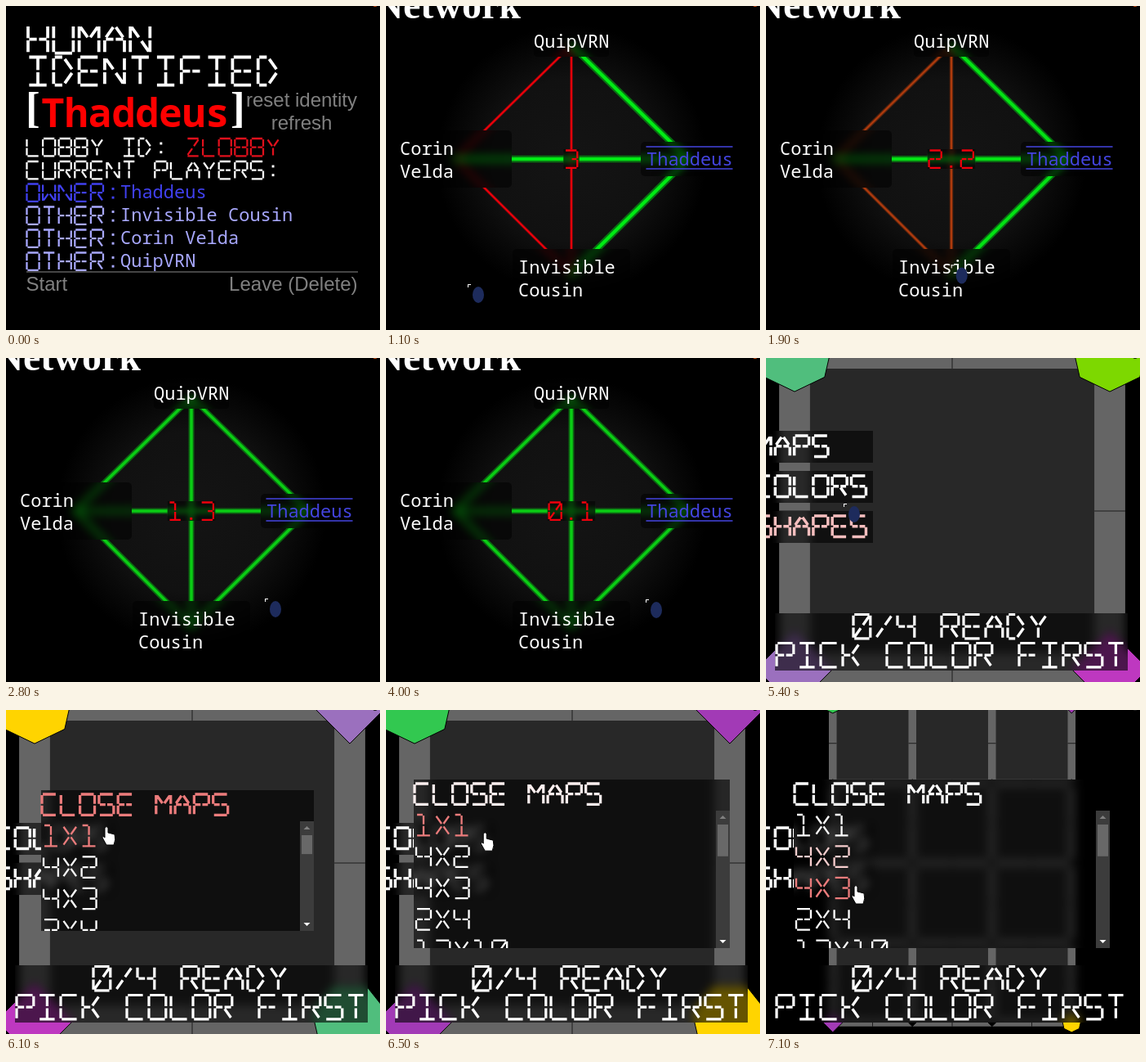
Write an HTML page with a canvas that moves like this. It is 458 by 396 pixels and loops after 7200 ms.

```html
<!DOCTYPE html>
<html lang="en">
<head>
<meta charset="utf-8">
<title>Lobby to map</title>
<style>
  html, body { margin: 0; width: 100%; height: 100%; overflow: hidden; background: #000; }
  canvas { display: block; width: 458px; height: 396px; }
</style>
</head>
<body>
<canvas id="stage" width="458" height="396"></canvas>
<script>
const canvas = document.getElementById('stage');
const ctx = canvas.getContext('2d');
const LOOP = 7200, STEP = 100;
const MONO = '"Noto Sans Mono", monospace';
const SANS = '"Liberation Sans", Arial, sans-serif';
const SERIF = '"Liberation Serif", serif';
const ME = 'Thaddeus', BOT = 'QuipVRN';

// Segments join points of a 3x3 grid: x0 y0 x1 y1.
const SEG = {
  a: '0020', b: '2021', c: '2122', d: '0222', e: '0102', f: '0001', g: '0111', h: '1121',
  i: '0011', j: '1011', k: '2011', l: '1102', m: '1112', n: '1122',
  p: '0010', q: '0212', r: '1021', s: '2112', t: '0110'
};
const GLYPH = {
  A: 'ceghrt', B: 'abcdefgh', C: 'adef', D: 'efpqrs', E: 'adefgh', F: 'aefgh', H: 'bcefgh',
  I: 'adjm', K: 'efgkn', L: 'def', M: 'bcefik', N: 'bcefin', O: 'abcdef', P: 'abefgh',
  R: 'abefghn', S: 'acdfgh', T: 'ajm', U: 'bcdef', W: 'bcefln', X: 'ikln', Y: 'ikm', Z: 'adkl',
  0: 'abcdefkl', 1: 'pjmd', 2: 'abdegh', 3: 'abcdh', 4: 'bcfgh', 5: 'acdfgh', 6: 'acdefgh',
  7: 'abc', 8: 'abcdefgh', 9: 'abcdfgh', '/': 'kl'
};

const clamp = (v, lo = 0, hi = 1) => Math.min(hi, Math.max(lo, v));
const lerp = (a, b, u) => a + (b - a) * u;
const ramp = (t, from, to) => clamp((t - from) / (to - from));
const mix = (a, b, u) => `rgb(${a.map((v, i) => Math.round(lerp(v, b[i], u)))})`;

// Rows are [time, ...values]; values are eased between rows.
function track(rows, t) {
  const n = rows.findIndex(r => r[0] > t);
  if (n === 0) return rows[0].slice(1);
  if (n < 0) return rows[rows.length - 1].slice(1);
  const a = rows[n - 1], b = rows[n], u = ramp(t, a[0], b[0]);
  return a.slice(1).map((v, i) => lerp(v, b[i + 1], u * u * (3 - 2 * u)));
}

function digital(str, x, y, adv, color, weight = .11) {
  const w = adv * .77, h = adv * 1.09, gap = adv * .045;
  ctx.strokeStyle = ctx.fillStyle = color;
  ctx.lineWidth = adv * weight;
  ctx.lineCap = 'butt';
  ctx.beginPath();
  [...str].forEach((ch, n) => {
    const left = x + n * adv, dot = adv * .15;
    if (ch === ':' || ch === '.') {
      for (const v of ch === ':' ? [.28, .78] : [.93])
        ctx.fillRect(left + w / 2 - dot / 2, y + h * v - dot / 2, dot, dot);
    }
    for (const s of GLYPH[ch] || '') {
      const [x0, y0, x1, y1] = [...SEG[s]].map((v, i) => i % 2 ? y + v * h / 2 : left + v * w / 2);
      const len = Math.hypot(x1 - x0, y1 - y0);
      const cut = (x0 !== x1 && y0 !== y1 ? gap * 2 : gap) / len;
      ctx.moveTo(lerp(x0, x1, cut), lerp(y0, y1, cut));
      ctx.lineTo(lerp(x1, x0, cut), lerp(y1, y0, cut));
    }
  });
  ctx.stroke();
}

function text(str, x, y, font, color, align = 'left') {
  ctx.font = font;
  ctx.fillStyle = color;
  ctx.textAlign = align;
  ctx.fillText(str, x, y);
}

function line(x0, y0, x1, y1, color, width) {
  ctx.strokeStyle = color;
  ctx.lineWidth = width;
  ctx.beginPath();
  ctx.moveTo(x0, y0);
  ctx.lineTo(x1, y1);
  ctx.stroke();
}

// Dark pane that blurs whatever lies behind it.
function glass(x, y, w, h, alpha = .6, blur = 5, radius = 0) {
  ctx.save();
  ctx.beginPath();
  ctx.roundRect(x, y, w, h, radius);
  ctx.clip();
  ctx.filter = `blur(${blur}px)`;
  ctx.drawImage(canvas, 0, 0);
  ctx.filter = 'none';
  ctx.fillStyle = `rgba(0,0,0,${alpha})`;
  ctx.fillRect(x, y, w, h);
  ctx.restore();
}

function pointer(x, y) {
  line(x, y + .5, x + 4, y + .5, '#fff', 1);
  line(x + .5, y, x + .5, y + 4, '#fff', 1);
  ctx.fillStyle = '#1d2b5c';
  ctx.beginPath();
  ctx.ellipse(x + 13, y + 13, 7, 10, 0, 0, 7);
  ctx.fill();
}

function hand(x, y) {
  ctx.fillStyle = '#fff';
  ctx.strokeStyle = '#000';
  ctx.lineWidth = 1;
  ctx.beginPath();
  ctx.moveTo(x + 3, y + 2);
  ctx.quadraticCurveTo(x + 5, y - 1, x + 7, y + 2);
  ctx.lineTo(x + 7, y + 8);
  ctx.lineTo(x + 15, y + 10);
  ctx.quadraticCurveTo(x + 17, y + 16, x + 14, y + 23);
  ctx.lineTo(x + 5, y + 23);
  ctx.lineTo(x, y + 14);
  ctx.quadraticCurveTo(x, y + 11, x + 3, y + 14);
  ctx.closePath();
  ctx.fill();
  ctx.stroke();
}

function speck(color) {
  ctx.fillStyle = color;
  ctx.beginPath();
  ctx.arc(452, -2, 3, 0, 7);
  ctx.fill();
}

const POINTER = [
  [200, 62, 396], [500, 48, 338], [700, 48, 338], [900, 72, 358], [1100, 100, 340],
  [1600, 190, 324], [2400, 306, 300], [2800, 317, 294], [3400, 374, 304], [4000, 318, 295],
  [4800, 318, 295], [5400, 95, 178], [5700, 92, 108], [5800, 100, 118], [6100, 118, 142],
  [6600, 116, 150], [7100, 105, 214]
];

function lobby(t) {
  digital('HUMAN', 27, 23.5, 31.3, '#fff', .12);
  digital('IDENTIFIED', 27, 62.5, 31.3, '#fff', .12);
  text('[', 24, 142, `bold 53px ${SERIF}`, '#fff');
  text(']', 275, 142, `bold 53px ${SERIF}`, '#fff');
  text(ME, 43, 148, `bold 48px ${MONO}`, '#f00');
  const grey = '#808080', ui = `24px ${SANS}`;
  text('reset identity', 362, 123, ui, grey, 'center');
  text('refresh', 362, 151, ui, grey, 'center');
  digital('LOBBY ID:', 25.5, 162, 19.6, '#fff', .115);
  digital('ZLOBBY', 221.5, 162, 19.6, '#e0101c', .115);
  digital('CURRENT PLAYERS:', 25.5, 190, 19.6, '#fff', .115);
  [ME, 'Invisible Cousin', 'Corin Velda', BOT].forEach((name, i) => {
    const color = i ? '#a8a8ff' : '#4040f0', y = 217.5 + 28 * i;
    digital(i ? 'OTHER:' : 'OWNER:', 25.5, y, 19.6, color, .115);
    text(name, 140, y + 17.5, `500 22px ${MONO}`, color);
  });
  line(25, 325, 431, 325, '#5c5c5c', 1.6);
  text('Start', 24.5, 348, ui, grey);
  text('Leave (Delete)', 430.5, 348, ui, grey, 'right');
  speck('#c84a10');
  if (t >= 200) pointer(...track(POINTER, t));
}

function network(t) {
  const glow = ctx.createRadialGradient(227, 188, 0, 227, 188, 165);
  glow.addColorStop(0, '#141414');
  glow.addColorStop(.6, '#111');
  glow.addColorStop(1, '#000');
  ctx.fillStyle = glow;
  ctx.fillRect(0, 0, 458, 396);

  const top = [227, 48], left = [85, 187], right = [370, 187], bottom = [227, 328];
  const u = ramp(t, 1700, 2400);
  const late = mix([240, 0, 10], [10, 205, 20], u), mine = mix([0, 235, 20], [10, 205, 20], u);
  ctx.lineCap = 'round';
  // Bright core inside a soft, dimmer edge.
  const link = (a, b, color, width) => {
    ctx.globalAlpha = .45;
    line(...a, ...b, color, width);
    ctx.globalAlpha = 1;
    line(...a, ...b, color, width * .5);
  };
  for (const [a, b] of [[top, left], [left, bottom], [top, bottom]]) link(a, b, late, lerp(3.6, 7, u));
  for (const node of [top, left, bottom]) link(right, node, mine, lerp(8.4, 7, u));

  glass(181, 34, 92, 28, .55, 5, 4);
  glass(16, 152, 138, 70, .55, 6, 5);
  glass(312, 166, 116, 42, .55, 5, 5);
  glass(155, 297, 144, 70, .55, 6, 5);

  const font = `500 22px ${MONO}`;
  text('Network', 165, 15, `bold 48px ${SERIF}`, '#fff', 'right');
  text(BOT, 181, 51, font, '#fff');
  text('Corin', 17, 182, font, '#fff');
  text('Velda', 17, 210, font, '#fff');
  text('Invisible', 162, 327, font, '#fff');
  text('Cousin', 162, 355, font, '#fff');
  text(ME, 319, 195, font, '#4444e0');
  line(319, 172, 424, 172, '#4444e0', 1.5);
  line(319, 199, 424, 199, '#4444e0', 1.5);

  const tenths = clamp(Math.round((4100 - t) / 100), 0, 30);
  const count = String(tenths / 10), wide = count.length * 19.6;
  glass(227 - wide / 2, 175, wide, 24, .55, 3);
  digital(count, 229 - wide / 2, 176.5, 19.6, '#f0000c', .115);
  speck('#c84a10');
  pointer(...track(POINTER, t));
}

const LIME = '#7dd800', MINT = '#50be7d', ORANGE = '#ff6e0a', YELLOW = '#ffd400';
const PURPLE = '#a23ab6', VIOLET = '#9b70be', MAGENTA = '#be38c0';
const SHARP = [PURPLE, VIOLET, MAGENTA];
const PIECES = [
  [4200, PURPLE, ORANGE, LIME, PURPLE],
  [4900, MINT, LIME, VIOLET, MAGENTA],
  [5600, YELLOW, VIOLET, MAGENTA, MINT],
  [6500, '#32c850', PURPLE, PURPLE, YELLOW]
];

function polygon(x, y, r, sides, fill) {
  ctx.beginPath();
  for (let i = 0; i < sides; i++) {
    const a = Math.PI * (.5 + 2 * i / sides);
    ctx.lineTo(x + r * Math.cos(a), y + r * Math.sin(a));
  }
  ctx.closePath();
  ctx.fillStyle = fill;
  ctx.fill();
  ctx.strokeStyle = '#000';
  ctx.lineWidth = 1;
  ctx.stroke();
}

function board(rows, cols, t) {
  const cell = rows === 1 ? 386 : 97.5, wall = cell * .098;
  const w = cols * cell, h = rows * cell, x = 228 - w / 2, y = 187 - h / 2;
  ctx.lineCap = 'butt';
  ctx.fillStyle = '#282828';
  ctx.fillRect(x, y, w, h);
  for (let c = 0; c <= cols; c++) line(x + c * cell, y, x + c * cell, y + h, '#656565', wall);
  for (let r = 0; r <= rows; r++) line(x, y + r * cell, x + w, y + r * cell, '#656565', wall);
  const half = wall / 2;
  for (let c = 0; c <= cols; c++) {
    for (let r = 0; r <= rows; r++) {
      const px = x + c * cell, py = y + r * cell;
      if (r < rows) line(px - half, py + cell / 2, px + half, py + cell / 2, '#1c1c1c', 1);
      if (c < cols) line(px + cell / 2, py - half, px + cell / 2, py + half, '#1c1c1c', 1);
      if (rows > 1) polygon(px, py, half, 4, '#000');
    }
  }
  const colors = PIECES.filter(p => p[0] <= t).pop().slice(1);
  colors.forEach((color, i) => {
    const px = x + (i % 2) * w, py = y + (i > 1) * h;
    polygon(px, py, cell * .122, SHARP.includes(color) ? 4 : 7, color);
  });
}

const WHITE = [255, 255, 255], PINK = [236, 124, 124];
// Hover tint rises on entry and falls after leaving.
const tint = (t, enter, leave) =>
  mix(WHITE, PINK, Math.min(ramp(t, enter, enter + 200), 1 - ramp(t, leave, leave + 400)));

const POPUP = [[5800, 62, 112, 270, 140], [6100, 43, 98, 334, 172], [6400, 34, 85, 387, 206]];
const ITEMS = [
  ['1X1', 5900, 6550], ['4X2', 6600, 6850], ['4X3', 6850, 9000], ['2X4', 9000, 9999], ['17X10', 9000, 9999]
];

function popup(t) {
  const [x, y, w, h] = track(POPUP, t);
  glass(x, y, w, h, .62, 6);
  digital('CLOSE MAPS', x + 1, y + 5, 23.3, tint(t, 5600, 6150), .14);

  const top = y + 38, bottom = y + h, view = bottom - top;
  ctx.save();
  ctx.beginPath();
  ctx.rect(x, top, w, view);
  ctx.clip();
  ITEMS.forEach(([label, enter, leave], i) =>
    digital(label, x + 3, top + 5 + i * 38.4, 23.3, tint(t, enter, leave), .1));
  ctx.restore();

  const bar = x + w - 17, mid = bar + 8.5;
  ctx.fillStyle = '#3c3c3c';
  ctx.fillRect(bar, top, 17, view);
  ctx.fillStyle = '#686868';
  ctx.fillRect(bar + 2, top + 17, 13, (view - 34) * view / 580);
  for (const [tip, dir, color] of [[top + 6, 1, '#808080'], [bottom - 6, -1, '#fff']]) {
    ctx.fillStyle = color;
    ctx.beginPath();
    ctx.moveTo(mid, tip);
    ctx.lineTo(mid - 4, tip + 4 * dir);
    ctx.lineTo(mid + 4, tip + 4 * dir);
    ctx.fill();
  }
}

function arena(t) {
  if (t < 6800) board(1, 1, t);
  else board(4, t < 7000 ? 2 : 3, t);
  speck('#181818');

  const open = t >= 5800;
  const menu = [['MAPS', 5500, 9000], ['COLORS', 5450, 5550], ['SHAPES', 5300, 5450]];
  menu.forEach(([label, enter, leave], i) => {
    if (open && !i) return;
    const y = 89 + 49 * i;
    glass(-20, y, 151, 39, .6, 5);
    digital(label, -12, y + 6, 23.3, tint(t, enter, leave), .15);
  });
  if (open) popup(t);

  glass(11, 312, 432, 70, .6, 6);
  digital('0/4 READY', 107, 313.5, 27, '#fff', .12);
  digital('PICK COLOR FIRST', 13, 348.5, 27, '#fff', .12);

  const [x, y] = track(POINTER, t);
  (t >= 5900 ? hand : pointer)(x, y);
}

function draw(t) {
  ctx.fillStyle = '#000';
  ctx.fillRect(0, 0, 458, 396);
  if (t < 700) lobby(t);
  else if (t < 900) speck('#c84a10');
  else if (t < 4200) network(t);
  else arena(t);
}

const start = performance.now();
let shown = -1;
function tick() {
  const t = Math.floor((performance.now() - start) % LOOP / STEP) * STEP;
  if (t !== shown) draw(shown = t);
  requestAnimationFrame(tick);
}
tick();
</script>
</body>
</html>
```
